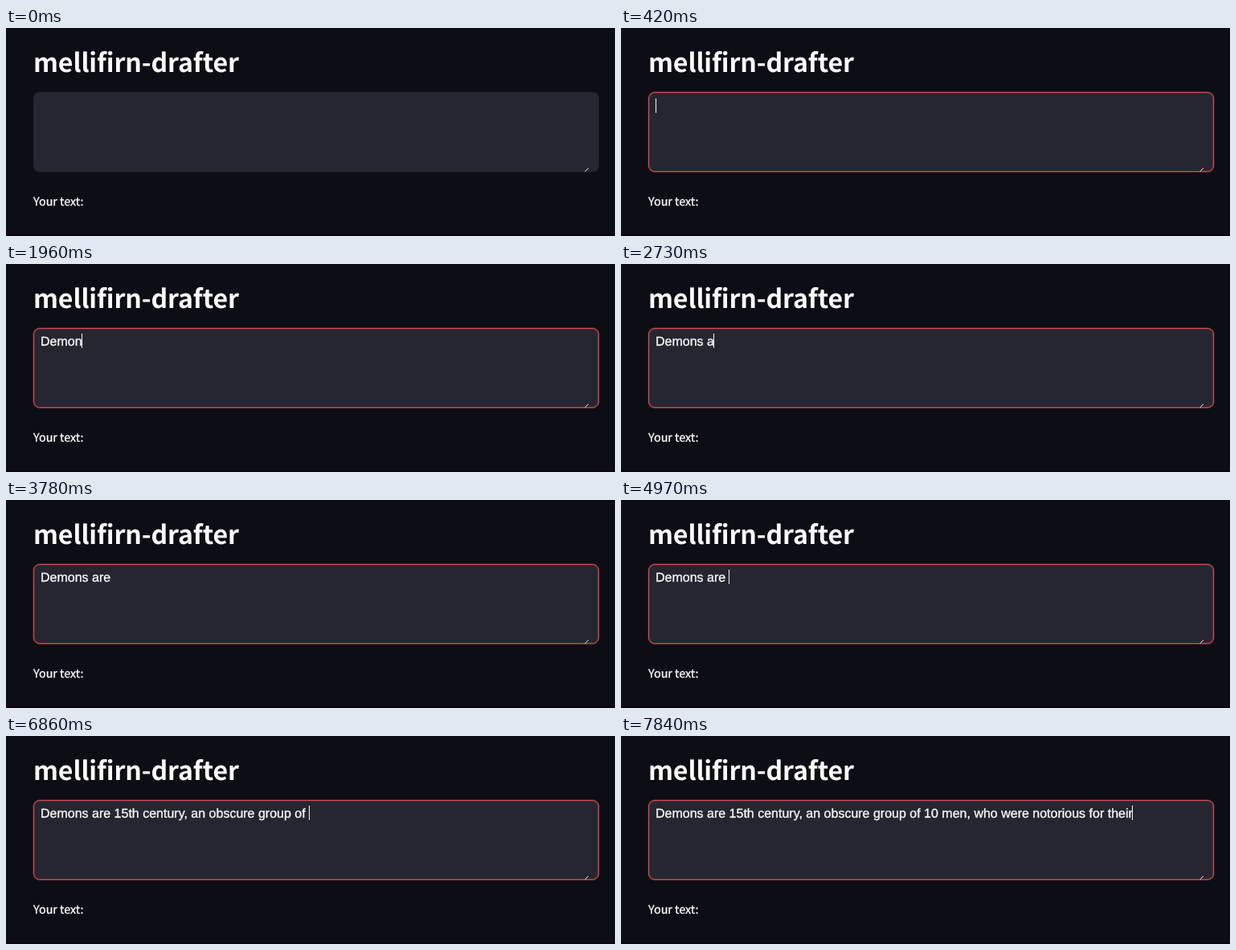
Animation of 758x260 px, one loop 8 s. Source, as an HTML page:

```html
<!DOCTYPE html>
<html lang="en">
<head>
<meta charset="utf-8">
<title>Writing assistant</title>
<style>
  html, body { margin: 0; width: 100%; height: 100%; overflow: hidden; background: #0d0d15; }
  svg { display: block; }
  text { fill: #fafafa; white-space: pre; text-rendering: geometricPrecision; }
  .ui { font-family: "Noto Sans CJK JP", "Noto Sans CJK SC", "Noto Sans CJK", "Open Sans", sans-serif; }
  .title { font-size: 32.2px; font-weight: 700; letter-spacing: -0.005em; }
  .label { font-size: 14.33px; }
  .input { font: 16px "Liberation Sans", Arial, sans-serif; }
  .label, .input { stroke: #fafafa; stroke-width: 0.35px; }
  .ring { fill: none; stroke: #d04b50; }
  .glow { stroke-width: 3px; opacity: 0.22; }
</style>
</head>
<body>
<svg width="758" height="260" viewBox="0 0 758 260">
  <text class="ui title" x="34" y="55">mellifirn-drafter</text>
  <rect x="34" y="80" width="704" height="100" rx="8" fill="#252630"/>
  <g id="focus">
    <rect class="ring glow" x="34.5" y="80.5" width="703" height="99" rx="7.5"/>
    <rect class="ring" x="34.5" y="80.5" width="703" height="99" rx="7.5"/>
  </g>
  <path d="M720.5 179.5L725 175" stroke="#e4e4e6" fill="none"/>
  <text class="ui label" x="34" y="222">Your text:</text>
  <text class="input" id="line1" x="43" y="101.5"></text>
  <text class="input" id="line2" x="43" y="122.5"></text>
  <rect id="caret" width="1" height="18" fill="#fafafa"/>
  <rect y="258" width="758" height="2" fill="#08080d"/>
</svg>
<script>
const LOOP = 8000;
const FOCUS_AT = 420;
const LEFT = 43;

const typed = "Demons are ";
const keyTimes = [1120, 1400, 1470, 1680, 1960, 2100, 2450, 2730, 2940, 3220, 3920];
const accepted = typed + "15th century, an obscure group of";

// Each entry: start time, text in the field
const edits = [
  [0, ""],
  ...keyTimes.map((time, i) => [time, typed.slice(0, i + 1)]),
  [5530, accepted],
  [6580, accepted + " people who were believed to be descended\nthrough magic."],
  [6860, accepted + " "],
  [7560, accepted + " 10 men, who were notorious for their"]
];

// Each entry: start time, caret visibility
const blinks = [
  [0, false], [FOCUS_AT, true], [910, false], [1120, true], [3780, false], [3920, true],
  [4480, false], [4970, true], [5460, false], [6020, true], [6510, false],
  [6860, true], [7420, false], [7840, true]
];

const [focus, line1, line2, caret] =
  ["focus", "line1", "line2", "caret"].map(id => document.getElementById(id));
const valueAt = (track, time) => track.findLast(([start]) => start <= time)[1];
const show = (element, visible) =>
  element.setAttribute("visibility", visible ? "visible" : "hidden");

function draw(time) {
  const [first, second = ""] = valueAt(edits, time).split("\n");
  line1.textContent = first;
  line2.textContent = second;
  show(focus, time >= FOCUS_AT);

  const end = first ? line1.getComputedTextLength() : 0;
  caret.setAttribute("x", Math.floor(LEFT + end));
  caret.setAttribute("y", first ? 87 : 88);
  show(caret, valueAt(blinks, time));
}

const begin = performance.now();
function tick() {
  draw((performance.now() - begin) % LOOP);
  requestAnimationFrame(tick);
}
tick();
</script>
</body>
</html>
```
